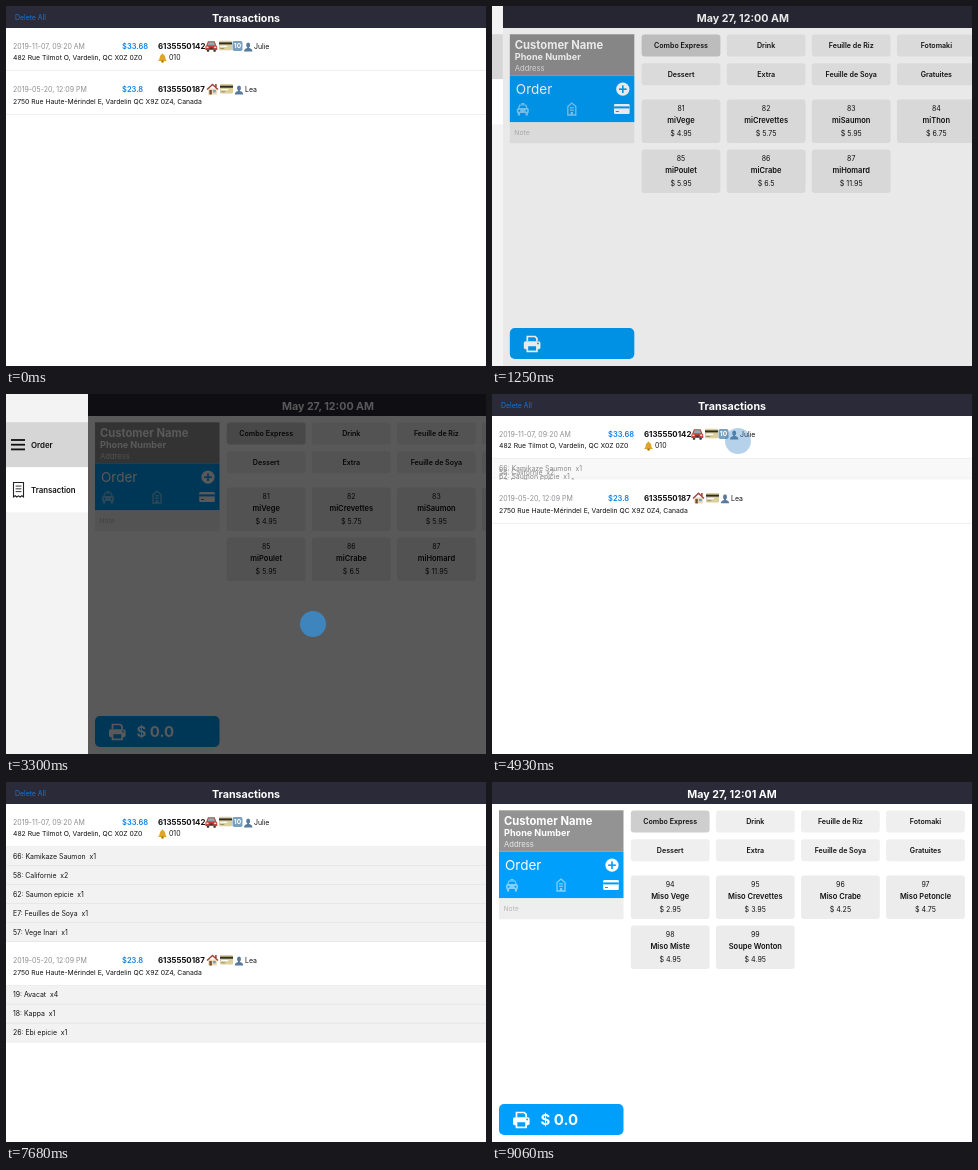
Write an HTML page that moves like this. It is 480 by 360 pixels and loops after 9130 ms.

```html
<!DOCTYPE html>
<html lang="en">
<head>
<meta charset="utf-8">
<title>Order and transaction screens</title>
<style>
html, body { margin: 0; width: 100%; height: 100%; overflow: hidden; background: #fff; }
svg { display: block; width: 480px; height: 360px; font-family: Inter, "Open Sans", sans-serif; }
text { white-space: pre; }
</style>
</head>
<body>
<svg id="stage" viewBox="0 0 480 360" xmlns="http://www.w3.org/2000/svg"></svg>
<script>
const LOOP = 9130;
const DRAWER = 82;
const ROW = 19;
const BLUE = '#009ffb';
const BAR = '#2a2a38';

// Drawing helpers; text is placed by its vertical centre.
const text = (x, cy, size, str, fill = '#111', weight = 400, anchor = 'start') =>
  `<text x="${x}" y="${cy + size * 0.36}" font-size="${size}" font-weight="${weight}" fill="${fill}" text-anchor="${anchor}">${str}</text>`;
const rect = (x, y, w, h, fill, r = 0, extra = '') =>
  `<rect x="${x}" y="${y}" width="${w}" height="${h}" rx="${r}" fill="${fill}" ${extra}/>`;
const path = (d, fill, extra = '') => `<path d="${d}" fill="${fill}" ${extra}/>`;
const group = (id, body, extra = '') => `<g id="${id}" ${extra}>${body}</g>`;
const at = (x, y, body) => `<g transform="translate(${x} ${y})">${body}</g>`;

const icons = {
  car: rect(1.5, 8.5, 2.4, 3.2, '#333', 0.6) + rect(8.1, 8.5, 2.4, 3.2, '#333', 0.6) +
    path('M2.6 1.2H9.4L11 5.4Q12 6 12 7.4V10H0V7.4Q0 6 1 5.4Z', '#c4423c') +
    path('M3.3 2.2H8.7L9.7 5.2H2.3Z', '#8fa9b8') +
    rect(1, 6.6, 2.2, 1.5, '#f5e3b5', 0.7) + rect(8.8, 6.6, 2.2, 1.5, '#f5e3b5', 0.7) +
    rect(4, 7.4, 4, 1.5, '#54312f', 0.4),
  card: rect(0, 0, 13, 9.6, '#dccf9c', 1) + rect(0, 1.7, 13, 2, '#2d2d2a') +
    rect(1.2, 5, 7, 1.2, '#fff') + rect(1.2, 7.4, 4, 0.8, '#8c875f'),
  ten: rect(0, 0, 10, 10, '#78a0bf', 1.8) + text(5, 5, 6.6, '10', '#fff', 700, 'middle'),
  person: `<ellipse cx="4.5" cy="3" rx="2" ry="2.6" fill="#587a9b"/>` +
    path('M0.3 9.4Q0.3 7 3.6 6V5H5.4V6Q8.7 7 8.7 9.4Z', '#587a9b'),
  house: path('M1.8 5.5H10.4V11.5H1.8Z', '#ead9b9') + path('M6 0.4L12 6L11 7L6 2.4L1 7L0 6Z', '#9c4a3c') +
    rect(8.6, 1, 1.6, 3, '#9c4a3c') + rect(2.9, 7, 2.4, 4.5, '#7b4b32') + rect(6.7, 7, 2.5, 2.3, '#6d9cba'),
  bell: path('M4.5 0.3Q5.3 0.3 5.4 1.2Q7.4 2 7.4 4.6Q7.5 6.6 9 7.6H0Q1.5 6.6 1.6 4.6Q1.6 2 3.6 1.2Q3.7 0.3 4.5 0.3Z', '#e0a528') +
    `<circle cx="4.5" cy="8.2" r="1.2" fill="#a8741c"/>`
};

const header = (y, date, amount, phone, address) =>
  rect(0, y, 480, 43.5, '#fff') + rect(0, y + 43, 480, 0.5, '#dedede') +
  text(7, y + 18.6, 7, date, '#8e8e93') +
  text(116, y + 18.4, 7.5, amount, '#0a7fe6', 600) +
  text(152, y + 18.4, 7.9, phone, '#111', 700) +
  text(7, y + 30.2, 6.8, address);

// One backing behind all labels, so that labels overlap while a section unfolds.
const itemRows = (id, items) => group(id,
  rect(0, 0, 480, ROW * items.length, '#f2f2f2') +
  items.map(s => `<g class="item">${rect(0, ROW - 0.6, 480, 0.6, '#e2e2e2')}${text(7, 9.5, 6.9, s)}</g>`).join(''));

const firstItems = ['66: Kamikaze Saumon  x1', '58: Californie  x2', '62: Saumon epicie  x1',
  'E7: Feuilles de Soya  x1', '57: Vege Inari  x1'];
const secondItems = ['19: Avacat  x4', '18: Kappa  x1', '26: Ebi epicie  x1'];

const transactions = rect(0, 0, 480, 360, '#fff') +
  itemRows('rows1', firstItems) +
  group('section2',
    itemRows('rows2', secondItems) +
    group('tail', rect(0, 108.5, 480, 400, '#fff')) +
    header(65, '2019-05-20, 12:09 PM', '$23.8', '6135550187',
      '2750 Rue Haute-Mérindel E, Vardelin QC X9Z 0Z4, Canada') +
    at(200.5, 77, icons.house) + at(214, 78, icons.card) + at(228.5, 79, icons.person) +
    text(239, 83.6, 6.9, 'Lea')) +
  header(21.5, '2019-11-07, 09:20 AM', '$33.68', '6135550142', '482 Rue Tilmot O, Vardelin, QC X0Z 0Z0') +
  at(199.3, 34, icons.car) + at(213, 34.7, icons.card) + at(226.5, 35, icons.ten) + at(237.7, 36, icons.person) +
  text(248, 40.4, 6.9, 'Julie') + at(152, 47.3, icons.bell) + text(163, 52, 6.9, '010') +
  rect(0, 0, 480, 22, BAR) + text(9, 11.2, 6.9, 'Delete All', '#1177dd') +
  text(240, 12.4, 10.7, 'Transactions', '#fff', 700, 'middle');

const colX = i => 138.8 + (i % 4) * 85.1;

const chips = ['Combo Express', 'Drink', 'Feuille de Riz', 'Fotomaki', 'Dessert', 'Extra', 'Feuille de Soya', 'Gratuites']
  .map((s, i) => {
    const y = 28.5 + Math.floor(i / 4) * 28.7;
    return rect(colX(i), y, 78.8, 22, i ? '#efefef' : '#cecece', 3) +
      text(colX(i) + 39.4, y + 11.2, 7.1, s, '#111', 600, 'middle');
  }).join('');

const products = (id, first, list) => group(id, list.map(([name, price], i) => {
  const x = colX(i), y = 93.5 + Math.floor(i / 4) * 49.9, mid = x + 39.4;
  return rect(x, y, 78.8, 43.6, '#ececec', 3) +
    text(mid, y + 8.9, 7, first + i, '#111', 400, 'middle') +
    text(mid, y + 21.1, 7.5, name, '#111', 600, 'middle') +
    text(mid, y + 34.4, 7.1, '$ ' + price, '#111', 400, 'middle');
}).join(''));

const taxi = path('M-3 -4.5H3L4.4 -0.8H-4.4Z', 'none', 'stroke="#fff" stroke-width="1.2"') +
  rect(-1.5, -6.5, 3, 1.6, '#fff') + rect(-6, -1, 12, 4.6, '#fff', 1.2) +
  rect(-5, 3, 2.2, 3, '#fff') + rect(2.8, 3, 2.2, 3, '#fff') +
  `<circle cx="-3.5" cy="1.2" r="1" fill="${BLUE}"/><circle cx="3.5" cy="1.2" r="1" fill="${BLUE}"/>`;
const building = path('M-4 6V-2.5L0 -6L4 -2.5V6Z', 'none', 'stroke="#fff" stroke-width="1.3"') +
  rect(-2, -1.8, 4, 1.2, '#fff') + rect(-2, 0.6, 4, 1.2, '#fff') + rect(-1.2, 3, 2.4, 3, '#fff');
const payCard = rect(-7.8, -5, 15.6, 10, '#fff', 1.2) + rect(-7.8, -2.6, 15.6, 2, BLUE) + rect(-6, 2, 3, 1, BLUE);
const printer = path('M-4.8 -3V-7.5H3L4.8 -5.7V-3', 'none', 'stroke="#fff" stroke-width="1.7"') +
  rect(-8.3, -2.8, 16.6, 8, '#fff', 1.8) + rect(-4.8, 1.4, 9.6, 6, BLUE, 0, 'stroke="#fff" stroke-width="1.7"') +
  `<circle cx="5.8" cy="-0.6" r="0.9" fill="${BLUE}"/>`;

const order = rect(0, 0, 480, 360, '#fff') + rect(0, 0, 480, 22, BAR) +
  `<text id="clock" x="240" y="16.2" font-size="10.7" font-weight="700" fill="#fff" text-anchor="middle"></text>` +
  rect(7, 28.3, 124.5, 41.2, '#939393') +
  text(12, 39.2, 11.2, 'Customer Name', '#fff', 700) +
  text(12, 51.2, 9.1, 'Phone Number', '#fff', 700) +
  text(12, 62, 7.6, 'Address', '#e6e6e6') +
  rect(7, 69.5, 124.5, 46.8, BLUE) + text(13, 83.4, 13.5, 'Order', '#fff') +
  `<circle cx="120" cy="83.2" r="6.6" fill="#fff"/>` +
  rect(116.2, 82.4, 7.6, 1.6, BLUE) + rect(119.2, 79.4, 1.6, 7.6, BLUE) +
  `<g opacity=".5">${at(20, 103.5, taxi)}${at(69, 103, building)}</g>` + at(119, 103, payCard) +
  rect(7, 116.3, 124.5, 21, '#eeeeee') + text(11.5, 127, 6.8, 'Note', '#b9b9b9') +
  chips +
  products('menuA', 81, [['miVege', '4.95'], ['miCrevettes', '5.75'], ['miSaumon', '5.95'], ['miThon', '6.75'],
    ['miPoulet', '5.95'], ['miCrabe', '6.5'], ['miHomard', '11.95']]) +
  products('menuB', 94, [['Miso Vege', '2.95'], ['Miso Crevettes', '3.95'], ['Miso Crabe', '4.25'],
    ['Miso Petoncle', '4.75'], ['Miso Miste', '4.95'], ['Soupe Wonton', '4.95']]) +
  rect(7, 322, 124.5, 31, BLUE, 5) + at(29.3, 338, printer) +
  group('total', text(48.5, 338, 15, '$ 0.0', '#fff', 700));

const drawer = rect(0, 0, DRAWER, 360, '#f3f3f3') +
  `<rect id="pickOrder" y="28.3" width="${DRAWER}" height="45"/>` +
  `<rect id="pickList" y="73.3" width="${DRAWER}" height="45"/>` +
  [46, 50.7, 55.4].map(y => rect(5, y - 0.9, 14, 1.8, '#111')).join('') +
  text(25, 51, 7.9, 'Order', '#111', 600) +
  path('M7.5 88.5H17.5V103L15.8 101.8L14.2 103L12.5 101.8L10.8 103L9.2 101.8L7.5 103Z', 'none', 'stroke="#222" stroke-width="1.1"') +
  [91.6, 94.4, 97.2].map(y => rect(9.6, y, 5.8, 0.9, '#222')).join('') +
  text(25, 96, 7.8, 'Transaction', '#111', 600);

const stage = document.getElementById('stage');
stage.innerHTML =
  group('page', group('transactions', transactions) + group('order', order) +
    `<rect id="dim" width="480" height="360" fill="#000"/>`) +
  group('drawer', drawer) +
  `<circle id="touch" r="13" fill="#3c8ac8"/>`;

const el = {};
stage.querySelectorAll('[id]').forEach(node => el[node.id] = node);

const clamp = v => Math.max(0, Math.min(1, v));
const ease = v => { v = clamp(v); return v * v * (3 - 2 * v); };
const ramp = (t, start, dur) => ease((t - start) / dur);
const show = (node, on) => node.setAttribute('display', on ? 'inline' : 'none');
const move = (node, x, y) => node.setAttribute('transform', `translate(${x} ${y})`);

const drawerRuns = [[40, 1000], [3050, 4100], [8000, 8700]];
const CLOSE = 325;
const swipe = start => [start, start + 290, 20, 230, 307, 230, 250];
const tap = (start, x, y, hold = 70) => [start, start + hold, x, y, x, y, hold];

// Each touch: start, release, from x, y, to x, y, travel time.
const touches = [
  swipe(40), tap(700, 40, 51, 90),
  [2050, 2730, 307, 255, 307, 215, 600],
  swipe(3050), tap(3900, 40, 96),
  tap(4780, 246, 47), tap(5580, 246, 178),
  [6130, 6480, 298, 309, 298, 268, 320],
  [7060, 7300, 298, 299, 298, 268, 230],
  swipe(8000), tap(8460, 40, 51)
];
const FADE = 140;

function drawerWidth(t) {
  for (const [open, close] of drawerRuns) {
    if (t <= open || t >= close + CLOSE) continue;
    const pulled = Math.min(DRAWER, 287 * ramp(t, open, 250));
    return pulled * (1 - ramp(t, close, CLOSE));
  }
  return 0;
}

// Rubber-band pull of the list, then its return.
const pull = (t, start, rise, release, dur, size) =>
  size * ramp(t, start, rise) * (1 - ramp(t, release, dur));
const scrollAt = t => pull(t, 6130, 320, 6480, 400, 20.5) + pull(t, 7060, 230, 7300, 370, 15);

function placeRows(node, top, open) {
  move(node, 0, top);
  node.setAttribute('opacity', Math.min(1, open * 2.2));
  node.querySelectorAll('.item').forEach((item, i) => move(item, 0, ROW * i * open));
}

function draw(t) {
  const onOrder = (t >= 1000 && t < 4100) || t >= 8700;
  const late = t >= 8700;
  const shift = drawerWidth(t);

  show(el.order, onOrder);
  show(el.transactions, !onOrder);
  show(el.menuA, !late);
  show(el.menuB, late);
  show(el.total, (t > 1310 && !late) || t > 9010);
  el.clock.textContent = late ? 'May 27, 12:01 AM' : 'May 27, 12:00 AM';

  move(el.page, shift, 0);
  move(el.drawer, shift - DRAWER, 0);
  el.dim.setAttribute('opacity', 0.65 * shift / DRAWER);
  el.pickOrder.setAttribute('fill', onOrder ? '#d6d6d6' : '#fff');
  el.pickList.setAttribute('fill', onOrder ? '#fff' : '#d6d6d6');

  const open1 = ramp(t, 4840, 300);
  const open2 = ramp(t, 5650, 300);
  const scroll = scrollAt(t);
  placeRows(el.rows1, 65 - scroll, open1);
  placeRows(el.rows2, 108.5, open2);
  move(el.tail, 0, ROW * secondItems.length * open2);
  move(el.section2, 0, ROW * firstItems.length * open1 - scroll);

  const now = touches.find(([start, end]) => t > start && t < end + FADE);
  show(el.touch, now);
  if (now) {
    const [start, end, x0, y0, x1, y1, dur] = now;
    const k = ramp(t, start, dur);
    move(el.touch, x0 + (x1 - x0) * k, y0 + (y1 - y0) * k);
    el.touch.setAttribute('opacity', 0.9 * (1 - clamp((t - end) / FADE)));
  }
}

const begin = performance.now();
function tick() {
  draw((performance.now() - begin) % LOOP);
  requestAnimationFrame(tick);
}
draw(0);
requestAnimationFrame(tick);
</script>
</body>
</html>
```
